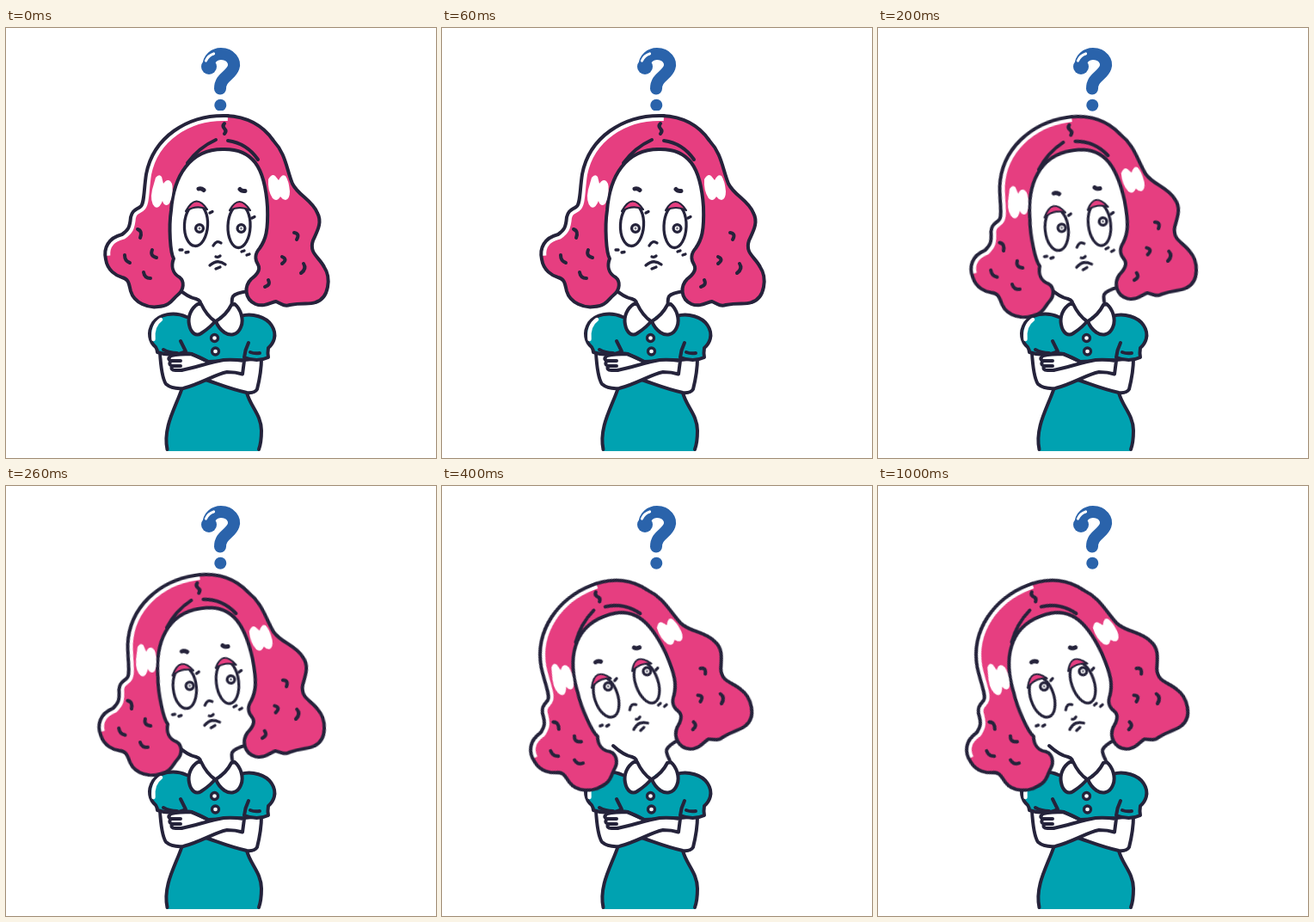
Animation of 500 by 500 pixels, one loop 1.4 s. Source, as an HTML page:

```html
<!DOCTYPE html>
<html lang="en">
<head>
<meta charset="utf-8">
<title>Puzzled woman</title>
<style>
  html, body { margin: 0; height: 100%; overflow: hidden; background: #fff; }
  svg { display: block; width: 100vw; height: 100vh; }

  .line { fill: none; stroke: #25233b; stroke-width: 4; stroke-linecap: round; stroke-linejoin: round; }
  .thin { stroke-width: 3.3; }
  .fine { stroke-width: 2.2; }
  .bold { stroke-width: 5; }
  .pink { fill: #e63e80; }
  .teal { fill: #00a2b1; }
  .white { fill: #fff; }
  .shine { fill: none; stroke: #fff; }

  /* Head tilts in hard steps, then holds */
  .tilt { transform-origin: 249px 317px; animation: tilt 1.4s step-end infinite; }
  .gaze { animation: gaze 1.4s step-end infinite; }
  @keyframes tilt {
    0% { transform: rotate(0deg); }
    7.14% { transform: rotate(-4.2deg); }
    14.28% { transform: rotate(-8.8deg); }
    21.42% { transform: rotate(-14.6deg); }
    28.57% { transform: rotate(-21.3deg); }
  }
  @keyframes gaze {
    0% { transform: translate(0, 0); }
    7.14% { transform: translate(1px, -2.5px); }
    14.28% { transform: translate(2px, -5px); }
    21.42% { transform: translate(2px, -8.5px); }
    28.57% { transform: translate(2.5px, -14.5px); }
  }
</style>
</head>
<body>
<svg viewBox="0 0 500 500">
  <defs>
    <path id="hairLeft" d="M258 102C210 100 171 128 163 170C160 190 161 205 156 208C150 212 147 212 145 220
      C144 232 142 235 135 240C119 244 113 256 116 269C118 282 128 288 135 290C143 292 143 298 145 306
      C149 320 166 326 177 324C190 324 194 315 199 311C208 304 207 294 202 290C193 285 192 276 195 268
      C191 262 189 232 192 212C195 172 214 141 252 141"/>
    <path id="hairRight" d="M250 141C287 139 301 162 304 208C305 236 302 246 295 256C288 264 290 270 293 275
      C297 282 290 288 285 292C277 300 277 315 290 321C300 325 308 319 314 318C320 321 324 324 330 322
      C346 319 352 322 360 319C376 314 378 290 370 278C364 266 352 262 357 247C362 236 368 226 362 215
      C356 200 340 195 333 181C326 163 325 146 311 131C298 112 279 103 256 102"/>
    <g id="pupil">
      <circle class="line white thin" r="4.4"/>
      <circle r="1.4" fill="#777685"/>
    </g>
  </defs>

  <!-- Question mark -->
  <g fill="#2a63ab">
    <path d="M235.500 45C235 35 243 30 250 30C261 30 267 39 264.500 46C261 56 249 57 249 70.500"
      fill="none" stroke="#2a63ab" stroke-width="14" stroke-linecap="round"/>
    <circle cx="236" cy="45" r="9"/>
    <circle cx="249.300" cy="89.700" r="7"/>
    <path class="shine" d="M232.500 38Q235 32 241.500 30" stroke-width="3.200" stroke-linecap="round"/>
  </g>

  <!-- Neck -->
  <path class="line" d="M199 302Q211 313 221 315Q228 317 226 324"/>
  <path class="line tilt" d="M282 306Q267 308 264 312Q262 315 263 324"/>

  <!-- Dress -->
  <path class="teal" d="M205 418C198 440 182 464 187.500 492H294Q297 482 297 468C297 450 284 440 280 424L250 402Z"/>
  <path class="line" d="M205 418C198 440 182 464 187.500 490M280 424C284 440 297 450 297 468Q297 482 294 490"/>
  <path class="teal" d="M208 335H276L286 366L276 390L207 395L200 360Z"/>

  <!-- Arms -->
  <path class="line white" d="M297 384C297 400 294 412 292 420Q289 425 280 424C258 419 245 413 232 409L204 398L192 381
    Q205 377 216 379Q224 383 235 388L277 386Z"/>
  <path class="line white" d="M179 377C180 395 182 408 186 414Q193 420 206 419C226 414 242 403 257 400Q267 400 275 402.500
    L277 387Q264 385 253 386C236 389 220 395 204 398L192 381Z"/>
  <path class="white" d="M181 379L212 378L204 397L185 400Z"/>
  <path class="line" d="M192 381Q202 379 215 379Q224 382 235 388M191 382Q187 385 192 387H203M192 387Q188 391 193 393H203
    M193 393Q191 398 197 398H204"/>

  <!-- Sleeves -->
  <path class="line teal" d="M210 336C195 329 178 333 171 343C164 354 167 365 174 371Q176 374 176 377Q194 383 209 376L203 364"/>
  <path class="shine" d="M180 339Q170 346 171.500 362" stroke-width="4.500" stroke-linecap="round"/>
  <path class="line teal" d="M273 335C286 331 303 336 309 346C316 357 311 367 305 372Q304 378 305 383Q292 389 277 383Q278 374 282 366"/>
  <path class="line" d="M183 374Q190 378 199 378M284 377Q289 379 295 378"/>

  <!-- Collar and buttons -->
  <path class="white" d="M227 321L243 341L262 321Z"/>
  <path class="line white" d="M223 321C215 326 211 336 213 345C215 355 221 359 227 355C233 351 239 347 243 341Q233 334 227 321Z"/>
  <path class="line white" d="M266 321C273 327 277 339 273 348C269 358 260 358 254 354Q247 349 244 341Q256 334 262 322Z"/>
  <g class="line white thin">
    <circle cx="242.500" cy="360.500" r="4"/>
    <circle cx="243.500" cy="376" r="4"/>
  </g>

  <!-- Head -->
  <g class="tilt">
    <use href="#hairLeft" class="pink"/>
    <use href="#hairRight" class="pink"/>
    <use href="#hairLeft" class="shine" stroke-width="12" stroke-dasharray="242 2000"/>
    <use href="#hairLeft" class="line"/>
    <use href="#hairRight" class="line"/>
    <path class="line" d="M254 111Q251 114 254 117Q257 120 254 123M244 130Q224 139 211 157M258 131Q280 134 293 153"/>
    <path class="white" d="M174 174Q178 169 181 173L183 181Q187 175 191 178Q195 182 193 194Q191 206 187 206
      Q183 206 182 201Q178 211 173 208Q167 202 170 188Z"/>
    <path class="white" d="M305 176Q309 169 313 172L317 177Q321 169 325 172Q329 178 330 190Q330 199 325 200
      Q321 199 319 196Q315 203 310 198Q304 189 305 176Z"/>
    <path class="line" d="M153 234Q159 236 156 244M138 264Q138 271 144 273M170 258Q167 265 175 267M160 284Q161 291 168 291
      M335 238Q342 239 338 246M321 266Q328 269 321 274M346 274Q350 280 343 285M305 293Q308 299 301 301"/>

    <!-- Face -->
    <ellipse class="line white thin" cx="221" cy="229" rx="13.500" ry="24.500" transform="rotate(3 221 229)"/>
    <ellipse class="line white thin" cx="271" cy="230.500" rx="13" ry="25" transform="rotate(2 271 231)"/>
    <path class="line pink fine" d="M209 213Q221 191 234 211Q222 205 209 213ZM260 212Q271 192 284 212Q272 206 260 212Z"/>
    <g class="gaze">
      <use href="#pupil" x="225" y="233"/>
      <use href="#pupil" x="273.500" y="233"/>
    </g>
    <path class="line thin" d="M237 215L240 213.500M286 221L289 219.500M202 258L205 258M209 261L212 260.500M274 260L277 259M280 264L283 263"/>
    <path class="line bold" d="M224 187Q227 186 230 188.500M272 187.500Q274 190 278 189.500"/>
    <path class="line thin" d="M241 253Q245 246 250 250M244 266Q247 267 249 265M237 276Q246 268 255 275M244 280L249 278"/>
  </g>
</svg>
</body>
</html>
```
